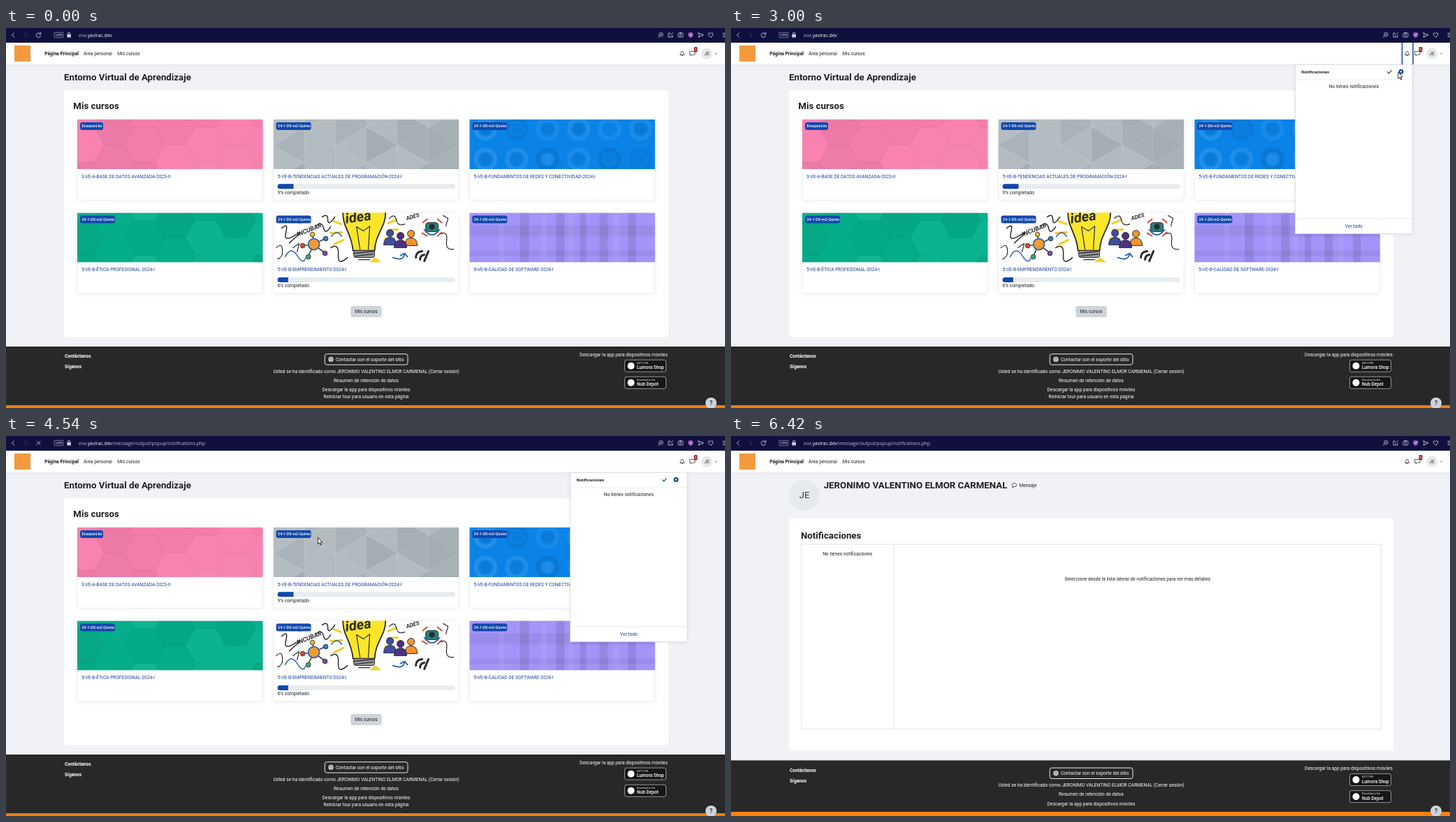
An HTML page that plays this animation: 1029x544 px, repeating every 6850 ms.

```html
<!DOCTYPE html>
<html lang="es">
<head>
<meta charset="utf-8">
<title>Entorno Virtual de Aprendizaje</title>
<style>
html, body { margin: 0; width: 100%; height: 100%; overflow: hidden; background: #f1f2f6; }
svg { display: block; overflow: hidden; }
#stage { width: 100vw; height: 100vh; font-family: Roboto, Arial, sans-serif; }
.line { fill: none; stroke-linecap: round; stroke-linejoin: round; }
.soft { filter: drop-shadow(0 1px 3px rgba(0, 0, 0, .06)); }
</style>
</head>
<body>
<svg id="stage" viewBox="0 0 1029 544" xmlns="http://www.w3.org/2000/svg"></svg>
<script>
const LOOP = 6850, BASE = 6.63, HEAD = { size: 13.27 };
const INK = '#1d2125', BLUE = '#1148ad', LINK = '#1d3f9c';
const USER = 'JERONIMO VALENTINO ELMOR CARMENAL';

let seed = 1;
const rnd = () => (seed = seed * 16807 % 2147483647) / 2147483647;

// y is the middle of the capitals
const text = (x, y, s, { size = BASE, fill = INK, weight = 400, at = 'start', more = '' } = {}) =>
  `<text x="${x}" y="${y + size * .36}" font-size="${size}" fill="${fill}" font-weight="${weight}" text-anchor="${at}" ${more}>${s}</text>`;
const mid = (x, y, s, o) => text(x, y, s, { at: 'middle', ...o });
const bold = (x, y, s, o) => text(x, y, s, { weight: 700, ...o });
const rect = (x, y, w, h, fill, r = 0, more = '') =>
  `<rect x="${x}" y="${y}" width="${w}" height="${h}" rx="${r}" fill="${fill}" ${more}/>`;
const circle = (x, y, r, fill, more = '') => `<circle cx="${x}" cy="${y}" r="${r}" fill="${fill}" ${more}/>`;
const ring = (x, y, r, stroke, w = .8) => circle(x, y, r, 'none', `stroke="${stroke}" stroke-width="${w}"`);
const line = (d, stroke, w = .9) => `<path class="line" d="${d}" stroke="${stroke}" stroke-width="${w}"/>`;
const shape = (d, fill, more = '') => `<path d="${d}" fill="${fill}" ${more}/>`;
const group = (id, s) => `<g id="${id}">${s}</g>`;
const shade = (light = .5, low = .02, high = .09) => {
  const tone = rnd() < light ? '221,221,221' : '34,34,34';
  return `rgba(${tone},${low + rnd() * (high - low)})`;
};

function hexagons(color, start) {
  seed = start;
  const s = 29, h = 50;
  const hex = (x, y) => {
    const p = [0, 1, 2, 3, 4, 5].map(k => [x + s * Math.cos(k * Math.PI / 3), y + s * Math.sin(k * Math.PI / 3)]);
    return `<polygon points="${p.join(' ')}" stroke="#000" stroke-opacity=".03" fill="${shade(.4, .01, .07)}"/>`;
  };
  let out = rect(0, 0, 266, 71, color);
  for (let c = 0; c < 8; c++)
    for (let r = -1; r < 3; r++) out += hex(9.5 + 43.5 * c, (c % 2 ? 11 : -14) + h * r);
  return out;
}

function triangles() {
  seed = 77;
  let out = rect(0, 0, 266, 71, '#b0b9be');
  const w = 44.4, s = 51;
  for (let c = 0; c < 6; c++)
    for (let k = -2; k < 6; k++) {
      const x = c * w, y = 11 + k * s / 2, right = (c + k) % 2 === 0;
      const [a, b] = right ? [x, x + w] : [x + w, x];
      out += `<polygon points="${a},${y - s / 2} ${a},${y + s / 2} ${b},${y}" stroke="#fff" stroke-opacity=".08" fill="${shade()}"/>`;
    }
  return out;
}

function rings() {
  seed = 15;
  let out = rect(0, 0, 266, 71, '#0983e8');
  for (let r = 0; r < 2; r++)
    for (let c = 0; c < 6; c++) {
      const x = 23 + c * 44.4, y = 13.5 + r * 43.5;
      out += ring(x, y, 13.8, shade(.7, .07, .13), 6) + circle(x, y, 8.5, shade(.3, .03, .1));
    }
  return out;
}

function plaid() {
  let out = rect(0, 0, 266, 71, '#a394fa');
  [[18, 16], [54, 8]].forEach(([y, h]) => out += rect(0, y, 266, h, '#222', 0, 'opacity=".07"'));
  [[72, 13], [124, 12], [158, 9], [186, 12], [227, 11]].forEach(([x, w]) => out += rect(x, 0, w, 71, '#222', 0, 'opacity=".11"'));
  [[42, 8], [102, 9], [141, 8], [205, 10]].forEach(([x, w]) => out += rect(x, 0, w, 71, '#ddd', 0, 'opacity=".08"'));
  return out;
}

function doodle() {
  const k = '#2b2b2f';
  const hand = (x, y, s, size, turn) =>
    text(x, y, s, { size, weight: 700, fill: k, more: `font-style="italic" transform="rotate(${turn} ${x} ${y})"` });
  const person = (x, y, c) => circle(x, y, 5, c, `stroke="${k}"`)
    + shape(`M${x - 9} ${y + 17}Q${x - 9} ${y + 6} ${x} ${y + 6}T${x + 9} ${y + 17}Z`, c, `stroke="${k}"`);
  let out = rect(0, 0, 266, 71, '#fff');
  out += line('M86 12L97 16M82 29L98 28M87 45L100 39M176 10L164 15M178 24L164 25M172 40L160 37', '#f3cd24', 3);
  out += shape('M100 -6C97 20 112 27 114 54H145C146 28 164 18 160 -6Z', '#fbe62a', `stroke="${k}" stroke-width="1.8"`);
  out += line('M124 52L119 20 129 26 138 19 136 52', k, 1.2);
  out += rect(115, 54, 30, 10, '#999', 3, `stroke="${k}"`) + line('M115 58L144 55M117 62L143 59M122 67H138', k, 1.4);
  out += shape('M137 71L146 64 155 71Z', '#f4d21f') + hand(103, 8, 'idea', 20, -8);
  out += hand(34, 31, 'INCUBAR', 9, -22) + hand(17, 7, 'CREAR', 8, 15) + hand(190, 8, 'ADES', 8, -16);
  out += line('M58 45L43 47M58 45L74 37M58 45L50 62M58 45L73 57M58 45L56 31', k, 1.4);
  out += circle(58, 45, 8, '#f39a2c', 'stroke="#2f66b5" stroke-width="1.8"');
  [[42, 47, '#d84a3a'], [75, 37, '#3978c0'], [50, 63, '#3fa164'], [74, 58, '#7b4ba1'], [56, 31, '#e7bb31']]
    .forEach(p => out += circle(p[0], p[1], 3.4, p[2], `stroke="${k}" stroke-width=".8"`));
  out += line('M12 22Q22 13 18 28T31 32T23 43M82 50Q94 43 93 60T106 64M70 6Q78 0 78 10T88 6M62 18Q70 12 72 22T82 20', k, 1.5);
  out += line('M4 50Q12 42 13 53T6 66M28 50L37 44 34 56M166 8Q174 0 176 10T188 16M240 30Q250 26 248 40T258 52', k, 1.2);
  out += line('M17 63Q25 47 34 61T46 65M83 34Q91 23 98 34', '#355fae', 1.5);
  out += person(167, 29, '#3f4ea0') + person(197, 30, '#f0952c') + person(182, 33, '#4f3181');
  out += rect(218, 14, 18, 13, '#257f78', 4, `stroke="${k}"`) + circle(227, 20, 4, k);
  out += line('M214 14L220 9M235 9L241 14M213 29L220 33M235 33L241 28', '#d44a38', 2);
  out += line('M216 24Q227 39 238 24M171 64Q186 70 188 58L182 61M188 58L192 63', '#2962ab', 1.8);
  return out + line('M204 64Q204 56 213 55M210 67Q210 61 216 60M216 69L222 55', k, 3) + line('M243 4L250 8 247 19', k, 1.2);
}

function card(x, y, label, title, art, done) {
  const w = label.startsWith('24') ? 50 : 33;
  return rect(x, y, 265.5, 115.3, '#fff', 3.5, 'class="soft" stroke="#e6e8ec" stroke-width=".7"')
    + `<svg x="${x}" y="${y}" width="265.5" height="71">${art}</svg>`
    + rect(x + 4, y + 4, w, 11, BLUE, 3)
    + text(x + 6.5, y + 9.5, label, { size: 5.4, weight: 500, fill: '#fff' })
    + text(x + 6, y + 81.5, title, { fill: LINK })
    + (done ? rect(x + 6, y + 92.3, 254.5, 7, '#e9ecef', 3.5)
      + shape(`M${x + 9.5} ${y + 92.3}h${2.545 * done - 3.5}v7h${3.5 - 2.545 * done}a3.5 3.5 0 0 1 0 -7Z`, BLUE)
      + text(x + 6, y + 104.4, done + '% completado') : '');
}

function badge(y, small, name) {
  return rect(885.5, y, 59, 17, '#161616', 2.5, 'stroke="#b5b5b5" stroke-width=".8"')
    + circle(894.5, y + 8.5, 5, '#fff')
    + text(903, y + 4.5, small, { size: 3.5, fill: '#fff' })
    + text(903, y + 10.8, name, { size: 6.5, fill: '#fff', weight: 500 });
}

function footer(y, barY, bar, tour) {
  const o = { fill: '#fff' };
  return rect(0, y, 1029, 544 - y, '#282828')
    + bold(84, y + 14, 'Contáctanos', o) + bold(84, y + 29, 'Síganos', o)
    + rect(456.2, y + 10.7, 118.8, 15.4, 'none', 3, 'stroke="#fff" stroke-width=".9"')
    + ring(465, y + 18.3, 3, '#fff', 1.1) + ring(465, y + 18.3, 1.3, '#fff', .7)
    + line(`M463 ${y + 16.3}l4 4m0 -4l-4 4`, '#fff', .7)
    + text(472, y + 18.4, 'Contactar con el soporte del sitio', o)
    + mid(515.5, y + 35.2, `Usted se ha identificado como ${USER} (Cerrar sesión)`, o)
    + mid(515.5, y + 48.6, 'Resumen de retención de datos', o)
    + mid(515.5, y + 62, 'Descargar la app para dispositivos móviles', o)
    + (tour ? mid(515.5, y + 72, 'Reiniciar tour para usuario en esta página', o) : '')
    + text(947, y + 11.7, 'Descargar la app para dispositivos móviles', { ...o, at: 'end' })
    + badge(y + 19.2, 'GET IT ON', 'Lumora Shop')
    + badge(y + 43.3, 'Download on the', 'Nub Depot')
    + rect(0, barY, 1029, 6, bar);
}

function browser() {
  const c = '#c9cae0', p = '#8d8db0';
  return rect(0, 0, 1029, 21, '#10103f')
    + line('M11.5 7L8.5 10 11.5 13', c) + line('M27 7L30 10 27 13', '#45456e')
    + group('reload', line('M49.3 8.4A3.3 3.3 0 1 0 49.8 11M49.8 6.6V8.8H47.6', c))
    + group('stop', line('M44 7.5L49 12.5M49 7.5L44 12.5', c))
    + rect(69, 6.3, 13, 7.5, 'none', 1, `stroke="${p}" stroke-width=".8"`)
    + mid(75.5, 10.1, 'VPN', { size: 5, fill: c })
    + rect(87.3, 9, 5.6, 4.6, c, .7) + line('M88.5 9V8Q88.5 6.4 90.1 6.4T91.7 8V9', c)
    + `<g font-family="'Open Sans', 'Noto Sans', sans-serif">`
    + text(104, 10.2, `<tspan fill="#a9aac6">eva.</tspan>yavirac.dev<tspan id="path" fill="#b9bad2">/message/output/popup/notifications.php</tspan>`, { size: 6.8, fill: '#fff' })
    + '</g>'
    + ring(937.4, 9.3, 2.8, c) + line('M935.3 11.4L933 13.6M936.2 9.3H938.6', c)
    + line('M950.5 7.3H948V13H954V10.5M950.5 10.8L954.5 6.7', c)
    + rect(961.8, 7.4, 7.2, 5.6, 'none', 1, `stroke="${c}" stroke-width=".8"`) + ring(965.4, 10.2, 1.3, c) + line('M964 6.8H966.8', c)
    + shape('M976.3 7.2L979.8 6 983.3 7.2V10Q983.3 12.7 979.8 14 976.3 12.7 976.3 10Z', '#a05cc0') + line('M978.4 10L979.5 11 981.4 8.8', '#fff', .7)
    + line('M991 7L998 10 991 13.2 992.2 10Z', c)
    + line('M1008.5 13.3L1005.6 10.3Q1004.5 8.6 1005.7 7.4 1007.3 6.3 1008.5 8 1009.7 6.3 1011.3 7.4 1012.5 8.6 1011.4 10.3Z', c)
    + line('M1026 7.5H1029M1026 10H1029M1026 12.5H1029', c);
}

function navbar() {
  return rect(0, 21, 1029, 31, '#fff', 0, 'class="soft"')
    + rect(12, 25, 23, 23, '#f39a3d')
    + bold(55.3, 36.3, 'Página Principal') + text(111, 36.3, 'Área personal') + text(159.3, 36.3, 'Mis cursos')
    + line('M964.8 38.2Q965.9 37 965.9 35.3 965.9 33.3 967.7 33.3T969.5 35.3Q969.5 37 970.6 38.2ZM967 39.6H968.4', '#333', .8)
    + line('M979 33.6H986V38.2H982.3L980.3 40V38.2H979Z', '#333', .8)
    + rect(984.6, 27.3, 4.8, 7.2, '#9c1c1c', 1) + mid(987, 31, '1', { size: 5, fill: '#fff', weight: 700 })
    + circle(1003, 36.5, 8, '#e6e9ec') + mid(1003, 36.5, 'JE', { fill: '#343a40' })
    + line('M1014.8 35.9L1016.2 37.3 1017.6 35.9', '#555', .8);
}

const tag = '24-1-DS-m2-Quinto', rows = [131, 264.6], cols = [102, 382.6, 663.3];
const home = () => bold(83, 70, 'Entorno Virtual de Aprendizaje', HEAD)
  + rect(83, 89, 865, 353.5, '#fff', 3)
  + bold(96.3, 111.5, 'Mis cursos', HEAD)
  + card(cols[0], rows[0], 'EnsayosLila', '3-VE-A-BASE DE DATOS AVANZADA-2023-II', hexagons('#f97fae', 421))
  + card(cols[1], rows[0], tag, '5-VE-B-TENDENCIAS ACTUALES DE PROGRAMACIÓN-2024-I', triangles(), 9)
  + card(cols[2], rows[0], tag, '5-VE-B-FUNDAMENTOS DE REDES Y CONECTIVIDAD-2024-I', rings())
  + card(cols[0], rows[1], tag, '5-VE-B-ÉTICA PROFESIONAL-2024-I', hexagons('#04b18d', 9001))
  + card(cols[1], rows[1], tag, '5-VE-B-EMPRENDIMIENTO-2024-I', doodle(), 6)
  + card(cols[2], rows[1], tag, '5-VE-B-CALIDAD DE SOFTWARE-2024-I', plaid())
  + rect(493.3, 398, 44.4, 16, '#ced4da', 3) + mid(515.5, 406, 'Mis cursos')
  + footer(456, 540, '#ef7f14', true);

const inbox = () => circle(105, 84.7, 22, '#e6e9ed') + mid(105, 84.7, 'JE', { size: 13, fill: '#343a40' })
  + bold(132.7, 70, USER, HEAD)
  + line('M404 72.3Q402 71 402.2 69.8 402.6 67.5 405.5 67.5T408.8 70Q408.6 72.5 405.4 72.5L402.6 73.5Z', '#333', .8)
  + text(412.4, 70.5, 'Mensaje')
  + rect(83, 117.5, 865, 333, '#fff', 3)
  + bold(100, 142.5, 'Notificaciones', HEAD)
  + rect(100.5, 155, 830, 264.5, 'none', 0, 'stroke="#dee2e6" stroke-width=".9"') + line('M233.5 155V419.5', '#dee2e6')
  + mid(166.7, 169, 'No tienes notificaciones')
  + mid(581.8, 204.3, 'Seleccione desde la lista lateral de notificaciones para ver más detalles')
  + footer(464.4, 538, '#ff800e', false);

const popup = () => `<rect id="panel" x="807.5" y="52.5" width="167.5" fill="#fff" stroke="#d5d8dc" stroke-width=".8" class="soft"/>`
  + shape('M963.5 52.8L967.7 48.5 972 52.8Z', '#fff', 'stroke="#e0e2e5" stroke-width=".5"') + rect(963, 52.9, 10, 1, '#fff')
  + bold(816.6, 62.8, 'Notificaciones', { size: 6.1 })
  + line('M939.5 62.8L941.5 64.8 945.2 60.8', '#0f3f87', 1.2)
  + ring(959, 62.5, 2.2, '#0f3f87', 1.8) + circle(959, 62.5, 3.2, 'none', 'stroke="#0f3f87" stroke-width="1.2" stroke-dasharray="1.26"')
  + line('M808 74H975', '#e3e6ea', .8)
  + mid(891.3, 83.7, 'No tienes notificaciones')
  + group('more', line('M808 273H975', '#dee2e6', .8) + mid(891.3, 283.5, 'Ver todo', { fill: LINK }));

const edge = 'stroke="#000" stroke-width=".8" stroke-linejoin="round"';
document.getElementById('stage').innerHTML = rect(0, 0, 1029, 544, '#f1f2f6')
  + group('home', home()) + group('inbox', inbox()) + navbar() + browser()
  + group('focus', rect(959.7, 21, 1.5, 31, BLUE) + rect(975.3, 21, 1.5, 31, BLUE))
  + group('popup', popup())
  + circle(1009, 537, 8, '#ced4da') + mid(1009, 537, '?', { size: 8.5, weight: 500 })
  + group('arrow', shape('M0 0V9.4L2.1 7.4 3.6 10.8 5 10.2 3.6 6.9H6.4Z', '#fff', edge))
  + group('hand', shape('M-1 .8C-1 -.3 1 -.3 1 .8V4.8L4.6 5.6Q5.7 6 5.5 7.4L4.9 10.3V12.6H-.6V11L-3.4 7.7C-3.7 6.4 -2.4 6.2 -1 7.9Z', '#fff', edge));

const el = id => document.getElementById(id);
const show = (id, on) => el(id).setAttribute('visibility', on ? 'visible' : 'hidden');

// pointer route: time, x, y
const route = [
  [90, 600, 544], [300, 690, 400], [520, 850, 170], [760, 940, 52], [900, 962, 38], [1040, 973, 32],
  [1240, 973, 32], [1380, 970, 33], [1650, 970, 33], [2070, 961.5, 33], [2310, 959, 38], [2350, 957, 52],
  [2700, 945, 80], [3040, 956, 61], [3590, 894.5, 270], [3700, 893, 278], [4200, 891, 281],
  [4540, 447.5, 145.5], [4850, 100, 84], [5060, 57.5, 82], [5160, 58, 105], [5830, 565, 396], [6400, 900, 546]
];

function pointer(t) {
  const i = Math.max(1, route.findIndex(k => k[0] >= t));
  const [a, b] = [route[i - 1], route[i]], p = (t - a[0]) / (b[0] - a[0]);
  return [a[1] + (b[1] - a[1]) * p, a[2] + (b[2] - a[2]) * p];
}

function draw(now) {
  const t = now % LOOP, within = (a, b) => t >= a && t < b;
  const opened = 4800, clicked = 4000;
  show('home', t < opened);
  show('inbox', t >= opened);
  show('path', t >= clicked);
  show('stop', within(clicked, opened));
  show('reload', !within(clicked, opened));
  show('focus', within(1690, 3900));
  show('popup', within(1690, opened));
  const grow = Math.min(1, Math.max(0, (t - 1690) / 620)), lift = 6.25 * (grow - 1);
  el('panel').setAttribute('height', 242 + lift);
  el('more').setAttribute('transform', `translate(0 ${lift})`);

  const moving = within(90, 6400);
  const overLink = within(860, 2330) || within(3700, 4240);
  show('arrow', moving && !overLink);
  show('hand', moving && overLink);
  if (moving) {
    const place = `translate(${pointer(t)})`;
    el('arrow').setAttribute('transform', place);
    el('hand').setAttribute('transform', place);
  }
  requestAnimationFrame(draw);
}
requestAnimationFrame(draw);
</script>
</body>
</html>
```
